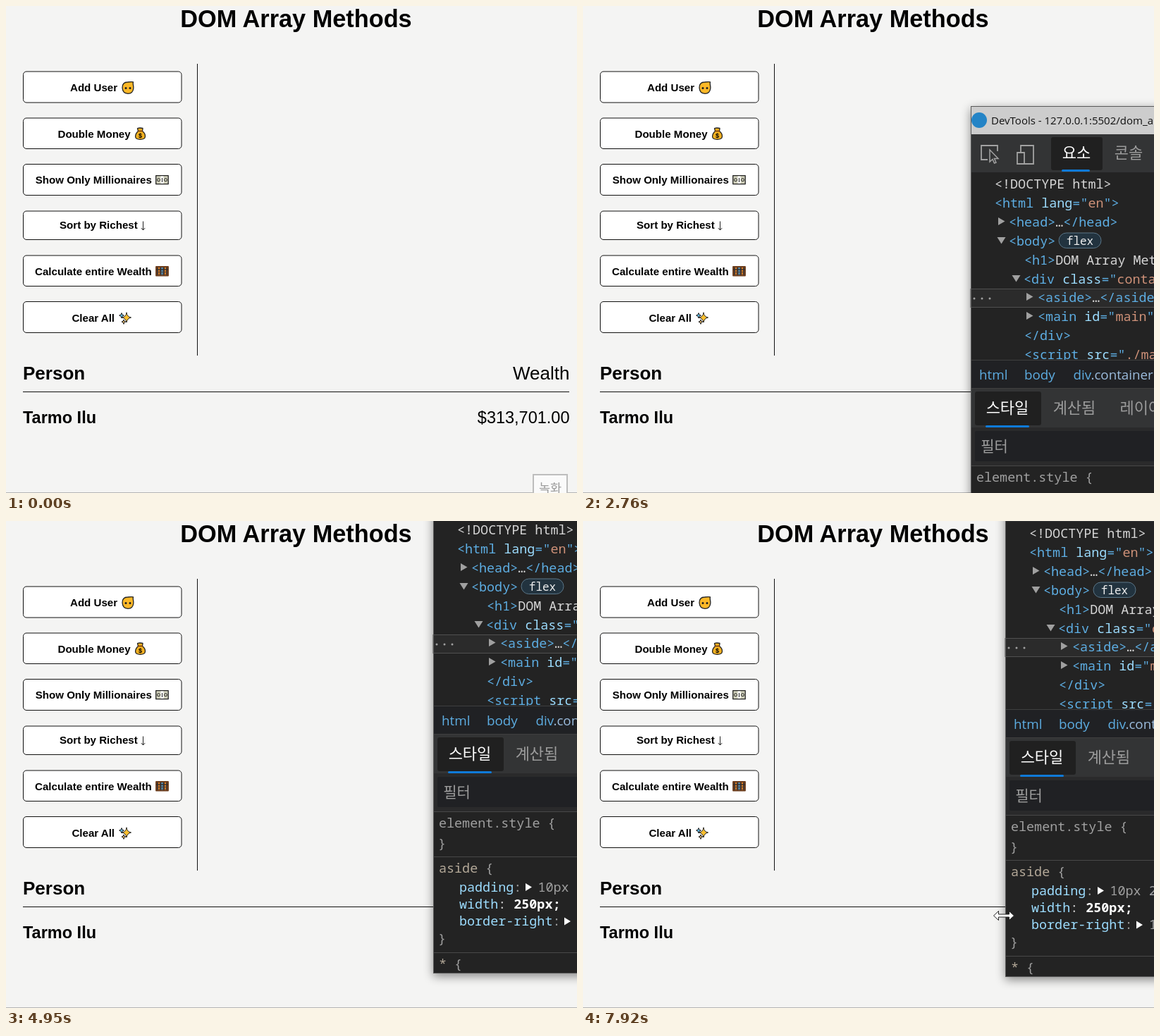
These frames come from a looping animation (810x691 px, 7.99 s). An HTML page:

```html
<!DOCTYPE html>
<html lang="en">
<head>
<meta charset="utf-8">
<title>DOM Array Methods</title>
<style>
html, body { margin: 0; width: 100%; height: 100%; overflow: hidden; background: #f4f4f3; }
svg { display: block; width: 810px; height: 691px; overflow: hidden; }
text { white-space: pre; }
.page { font-family: "Liberation Sans", Arial, sans-serif; fill: #000; }
.b { font-weight: bold; }
.btn rect { fill: #fff; stroke: #111; }
.btn text { font-size: 15.1px; font-weight: bold; }
.ui { font-family: "Open Sans", "Noto Sans", sans-serif; }
.ko { font: 22px "Noto Sans CJK KR", "Noto Sans CJK", sans-serif; text-anchor: middle; fill: #9c9c9c; }
.code { font: 500 18.4px "Noto Sans Mono", "DejaVu Sans Mono", monospace; fill: #d6d6d6; }
.tag { fill: #5dade2; }
.at { fill: #9cdcfe; }
.str { fill: #ce9178; }
.dim { fill: #a0a0a0; }
.sel { fill: #b3a898; }
.on { fill: #fff; }
.emo { stroke: #222; stroke-width: 1.3; stroke-linejoin: round; }
.cur { fill: #fff; stroke: #222; stroke-width: 1; stroke-linejoin: round; }
.shadow { filter: drop-shadow(0 4px 7px rgba(0, 0, 0, .45)); }
</style>
</head>
<body>
<svg viewBox="0 0 810 691">
  <g class="page">
    <rect width="810" height="691" fill="#f4f4f3"/>
    <text class="b" x="411.5" y="30" font-size="34.3" text-anchor="middle">DOM Array Methods</text>
    <g class="btn">
      <rect x="24.5" y="93" width="224.5" height="44" rx="4.5"/><text x="91" y="121">Add User</text>
      <rect x="24.5" y="159" width="224.5" height="43.5" rx="4.5"/><text x="73.5" y="187">Double Money</text>
      <rect x="24.5" y="224.5" width="224.5" height="44" rx="4.5"/><text x="41.7" y="252">Show Only Millionaires</text>
      <rect x="24.5" y="291" width="224.5" height="40.5" rx="4.5"/><text x="76" y="316">Sort by Richest</text>
      <rect x="24.5" y="354" width="224.5" height="43.5" rx="4.5"/><text x="41" y="381.5">Calculate entire Wealth</text>
      <rect x="24.5" y="419.5" width="224.5" height="44" rx="4.5"/><text x="93.4" y="448">Clear All</text>
    </g>
    <g class="emo">
      <g transform="translate(164 107)">
        <path d="M1 9Q1 1 8.5 1Q13 .5 16.5 .8Q15.8 3 16.6 6Q17 8 16.8 10Q16 17.3 9 17.3Q1.500 17 1 9Z" fill="#fcb827"/>
        <circle cx="6" cy="9.5" r=".9"/><circle cx="12" cy="9.5" r=".9"/>
      </g>
      <g transform="translate(182 172)">
        <path d="M5.5 5.5L4.5 1.5Q8 .5 12 1.5L11.5 5.5Q16 9 15.4 13.5Q15 17.3 8.5 17.3Q2 17.3 1.6 13.5Q1.5 9 5.5 5.5Z" fill="#f5b121"/>
        <path d="M5 5.5h7" stroke="#7b3d10" stroke-width="1.6"/>
        <text class="b" x="8.5" y="15" font-size="9" text-anchor="middle" stroke="none">$</text>
      </g>
      <g transform="translate(212 240)">
        <rect x=".7" y=".7" width="17.500" height="12" fill="#cfcfba"/>
        <rect x="7.500" y="1.500" width="4" height="10.500" fill="#fff" stroke="none"/>
        <g fill="none" stroke-width="1">
          <circle cx="4.500" cy="6.700" r="2"/><circle cx="14.500" cy="6.700" r="2"/>
          <path d="M9.500 4v6"/>
        </g>
      </g>
      <path d="M194.500 305.500v12.500M191.800 315l2.700 3 2.700-3" fill="none" stroke-width="1"/>
      <g transform="translate(212 369)">
        <rect x="1" y="1" width="17" height="12.500" fill="#4a3a32" stroke="#6b3c1c" stroke-width="1.800"/>
        <path d="M5 2v11M14 2v11" stroke="#e08020" stroke-width="2" stroke-dasharray="2.500 1"/>
        <path d="M9.500 2v11" stroke="#4f9fd0" stroke-width="2" stroke-dasharray="2.500 1"/>
        <path d="M1 5h17" stroke-width=".8"/>
      </g>
      <g transform="translate(160 434)" stroke-width="1">
        <path d="M11 .8Q11.500 7 17.500 8Q12 9 11 15Q10 9 4.500 8Q10.500 7 11 .8Z" fill="#fbbf2d"/>
        <path d="M4 1.500Q4.300 4.700 7.300 5Q4.500 5.500 4 9Q3.400 5.500 .6 5Q3.600 4.700 4 1.500Z" fill="#58b4e5"/>
        <path d="M7 11Q7.200 13.800 9.800 14Q7.400 14.500 7 17.400Q6.500 14.500 4 14Q6.700 13.800 7 11Z" fill="#d7a95a"/>
      </g>
    </g>
    <path d="M271.500 82V496M24 547.500H799" stroke="#111" fill="none"/>
    <path d="M0 690.500H810" stroke="#b4b4b4"/>
    <text class="b" x="24" y="530" font-size="26">Person</text>
    <text x="799.5" y="530" font-size="26" text-anchor="end">Wealth</text>
    <text class="b" x="24" y="591.5" font-size="23.5">Tarmo Ilu</text>
    <text x="799.5" y="591.5" font-size="23.5" text-anchor="end">$313,701.00</text>
  </g>

  <g id="tip">
    <rect x="748" y="665" width="48" height="40" fill="#fafafa" stroke="#bdbdbd" stroke-width="2"/>
    <text class="ko" x="772" y="690" style="font-size:17.5px">녹화</text>
  </g>

  <g id="frame">
    <rect class="shadow" width="1020" height="740" fill="#222"/>
    <g id="win">
      <rect width="1020" height="740" fill="#232323"/>
      <rect width="1020" height="40" fill="#cdcdcd"/>
      <circle cx="12" cy="20" r="11" fill="#2484c6"/>
      <text class="ui" x="29" y="25.5" font-size="15" fill="#111">DevTools - 127.0.0.1:5502/dom_array/index.html</text>

      <rect y="40" width="1020" height="54" fill="#333435"/>
      <rect x="114" y="44" width="73" height="47" rx="3" fill="#202020"/>
      <rect x="129" y="90" width="40" height="3" rx="1.5" fill="#0f7ad8"/>
      <g id="tabs">
        <g fill="none" stroke="#a2a2a2" stroke-width="1.8">
          <path d="M24 76H15V56H38V64"/>
          <path d="M27 62V79L31 75.5 33.5 81 36 80 33.5 74.5H39Z" stroke-width="1.5"/>
          <path d="M71 65V56H89V82H76M66 66h10v16h-10Z"/>
        </g>
        <g class="ko">
          <text class="on" x="150" y="74">요소</text><text x="224" y="74">콘솔</text>
          <text x="300" y="74">소스</text><text x="375" y="74">정보</text>
          <text x="505" y="74">응용 프로그램</text><text x="645" y="74">보안</text>
        </g>
      </g>

      <rect y="259.5" width="1020" height="26" fill="#2b2b2b" stroke="#505050"/>
      <g class="dim">
        <path d="M39 158v11l9.500-5.500ZM37.500 186h12l-6 9.500ZM58.500 240h12l-6 9.500ZM79 265v11l9.500-5.500ZM79 292v11l9.500-5.500Z"/>
        <circle cx="5" cy="273" r="1.5"/><circle cx="16" cy="273" r="1.5"/><circle cx="27" cy="273" r="1.5"/>
      </g>
      <g class="code" transform="translate(0 -.5)">
        <text x="34" y="117.5">&lt;!DOCTYPE html></text>
        <text x="34" y="144.5" class="tag">&lt;html <tspan class="at">lang</tspan>="<tspan class="str">en</tspan>"></text>
        <text x="54" y="171" class="tag">&lt;head><tspan fill="#d6d6d6">…</tspan>&lt;/head></text>
        <text x="54" y="198" class="tag">&lt;body></text>
        <rect x="125" y="180.5" width="60" height="21.5" rx="10.7" fill="#22333f" stroke="#5b7688"/>
        <text x="155" y="197.5" font-size="16" text-anchor="middle" fill="#eee">flex</text>
        <text x="76" y="225" class="tag">&lt;h1><tspan fill="#d6d6d6">DOM Array Methods</tspan>&lt;/h1></text>
        <text x="75" y="252" class="tag">&lt;div <tspan class="at">class</tspan>="<tspan class="str">container</tspan>"></text>
        <text x="95" y="278.5" class="tag">&lt;aside><tspan fill="#d6d6d6">…</tspan>&lt;/aside><tspan class="dim"> == $0</tspan></text>
        <text x="95" y="305.5" class="tag">&lt;main <tspan class="at">id</tspan>="<tspan class="str">main</tspan>"><tspan fill="#d6d6d6">…</tspan>&lt;/main></text>
        <text x="76" y="332.5" class="tag">&lt;/div></text>
        <text x="76" y="359" class="tag">&lt;script <tspan class="at">src</tspan>="<tspan class="str">./main.js</tspan>">&lt;/script></text>
      </g>

      <rect y="360" width="1020" height="41" fill="#202124"/>
      <path d="M0 360.5H1020M0 400.5H1020" stroke="#3f3f3f"/>
      <g class="ui tag" font-size="18.8">
        <text x="12" y="388">html</text><text x="76" y="388">body</text>
        <text x="145.5" y="388">div<tspan fill="#9bbbdc">.container</tspan></text>
        <text x="285" y="388">aside</text>
      </g>

      <rect y="401" width="1020" height="110" fill="#333435"/>
      <rect x="6" y="405" width="94" height="48" rx="3" fill="#202020"/>
      <rect id="tabHover" x="194" y="402" width="116" height="53" fill="#4b4b4b"/>
      <rect x="21" y="453" width="62" height="3" rx="1.5" fill="#0f7ad8"/>
      <g class="ko">
        <text class="on" x="52" y="436">스타일</text><text x="147" y="436">계산됨</text>
        <text x="252" y="436">레이아웃</text><text x="385" y="436">이벤트 수신기</text>
        <text x="530" y="436">DOM 중단점</text><text x="650" y="436">속성</text>
      </g>
      <rect y="456" width="1020" height="55" fill="#2a2a2b"/>
      <rect x="6" y="461" width="1004" height="43" rx="2" fill="#202124"/>
      <text class="ko" x="33.5" y="490" style="font-size:21px">필터</text>
      <path d="M0 510.5H1020M0 574.5H1020M0 710.5H1020" stroke="#484848"/>

      <g class="code">
        <text class="dim" x="8" y="533">element.style {</text>
        <text class="dim" x="7" y="562">}</text>
        <text x="8" y="596.5" class="sel">aside <tspan class="dim">{</tspan></text>
        <text x="37" y="623.5" class="at">padding<tspan class="dim">:</tspan></text>
        <text x="148.5" y="623.5" class="dim">10px 20px;</text>
        <text x="37" y="647.5" class="at">width<tspan fill="#d6d6d6">: </tspan><tspan class="on" font-weight="600">250px;</tspan></text>
        <text x="37" y="671.5" class="at">border-right<tspan class="dim">:</tspan></text>
        <text x="204" y="671.5" class="dim">1px solid #111;</text>
        <text class="dim" x="7" y="697">}</text>
        <text x="8" y="733" class="sel">* <tspan class="dim">{</tspan></text>
        <path class="on" d="M131 612v11l9-5.500ZM186 660.500v11l9-5.500Z"/>
      </g>
      <g id="checks">
        <g id="check">
          <rect x="8" y="607" width="22" height="22" rx="3" fill="#6a6a6a"/>
          <path d="M12.5 618.5l4.500 5 8.500-11" fill="none" stroke="#fff" stroke-width="2.8"/>
        </g>
        <use href="#check" y="24"/><use href="#check" y="48"/>
      </g>
      <rect x=".5" y=".5" width="1019" height="739" fill="none" stroke="#5a5a5a"/>
    </g>
  </g>

  <g id="preview" class="ui">
    <rect class="shadow" x="435" y="554.5" width="460" height="150" fill="#484848"/>
    <rect id="hover" y="554.5" width="226" height="140" fill="#5a5a5a"/>
    <circle cx="456" cy="576" r="11.5" fill="#2484c6"/>
    <circle cx="682" cy="576" r="11.5" fill="#2484c6"/>
    <text x="477" y="584" font-size="15.8" fill="#fff">DevTools - 127.0.0.1:...</text>
    <text x="703" y="584" font-size="15.8" fill="#fff">DevTools - 127.0.0.1:...</text>

    <rect x="446" y="598" width="203.5" height="100" fill="#232323"/>
    <rect x="446" y="606" width="203.5" height="21" fill="#333435"/>
    <use href="#tabs" transform="translate(446 598) scale(.2)"/>
    <rect x="488" y="615.5" width="8" height="1" fill="#0f7ad8"/>
    <path d="M446 616.5h203.5" stroke="#4a4a4a" stroke-width=".5"/>
    <rect x="494" y="618" width="41" height="8.5" fill="#202124"/>
    <g font-size="5" fill="#e4e4e4">
      <text x="469" y="624.5">top ▾</text><text x="496" y="624.5">필터</text><text x="539" y="624.5">기본 수준 ▾</text>
      <text x="595" y="613.5">»</text><text x="449" y="634" fill="#4a90d9">›</text>
    </g>
    <g fill="none" stroke="#ddd">
      <rect x="449.5" y="620" width="4" height="4"/><circle cx="462" cy="622" r="2"/><ellipse cx="487" cy="622" rx="2.5" ry="1.5"/>
      <circle cx="622" cy="611.5" r="1.7"/><circle cx="642.5" cy="622.5" r="1.7"/>
    </g>
    <rect x="605" y="609" width="8" height="5" rx="1" fill="#1d78c8"/><rect x="566" y="620" width="8" height="5" rx="1" fill="#1d78c8"/>

    <use href="#win" transform="translate(672 598) scale(.2)"/>
    <g id="strip">
      <rect x="446" y="598" width="203.5" height="8" fill="#fff"/>
      <circle cx="449" cy="602" r="2" fill="#2484c6"/>
      <text x="452.5" y="603.5" font-size="3.6" fill="#333">DevTools - 127.0.0.1:5502/dom_array/index.html</text>
    </g>
    <use href="#strip" x="226"/>
  </g>

  <g id="cursor" class="cur">
    <path id="arrow" d="M0 0V21L5 16.5 8.8 24.5 12 23 8.5 15H15Z"/>
    <path id="hand" d="M-2.5 1.5q2.200-3.500 4.500 0v8l7 1.500q4 1 3 5l-2 10h-11l-8-10q-1-4 3-2.500l3.500 3z"/>
    <path id="resize" d="M-14.5 0l7-6.500v4.500h15v-4.500l7 6.500-7 6.500v-4.500h-15v4.500z"/>
  </g>
</svg>
<script>
const LOOP = 7990;
const $ = id => document.getElementById(id);

// Each key is [time, x, y].
const winPath = [
  [2620, 410, 356], [2690, 482, 258], [2760, 550, 143], [2830, 577, 98], [3000, 597, 58], [3250, 603, 48],
  [4400, 603, 48], [4540, 604, -20], [4680, 606, -85], [4750, 606, -98],
  [4990, 606, -98], [5080, 599, -93]
];
const curPath = [
  [1040, 600, 700], [1200, 625, 650], [1470, 773, 623], [1810, 769, 631],
  [1900, 769, 631], [2500, 712, 378], [2620, 710, 376], [2690, 782, 278], [2760, 850, 163],
  [3440, 840, 470], [3590, 779, 511], [3720, 776, 560], [3920, 840, 600],
  [5260, 840, 100], [5480, 690, 300], [5700, 530, 500], [5860, 622, 550], [5930, 631, 554],
  [6160, 631, 554], [6400, 606, 574], [6890, 597, 560],
  [7020, 597, 560], [7120, 595, 562], [7230, 597, 560]
];

function along(keys, t) {
  const i = keys.findIndex(k => k[0] > t);
  if (i === 0) return keys[0].slice(1);
  if (i < 0) return keys[keys.length - 1].slice(1);
  const [t0, x0, y0] = keys[i - 1], [t1, x1, y1] = keys[i];
  const p = (t - t0) / (t1 - t0);
  return [x0 + (x1 - x0) * p, y0 + (y1 - y0) * p];
}

const ramp = (t, from, to) => Math.min(1, Math.max(0, (t - from) / (to - from)));
const show = (id, on) => { $(id).style.display = on ? "" : "none"; };
const within = (t, from, to) => t >= from && t < to;

function draw(t) {
  const [wx, wy] = along(winPath, t).map(Math.round);
  const [cx, cy] = along(curPath, t);

  show("tip", t < 70);

  show("preview", within(t, 720, 2090));
  $("preview").style.opacity = t < 790 ? .6 : 1 - ramp(t, 1950, 2090);
  $("hover").setAttribute("x", cx > 661 ? 661 : 435);
  show("hover", t >= 1050);

  const open = 1 - (1 - ramp(t, 1870, 2090)) ** 3;
  const scale = .9 + .1 * open;
  $("frame").style.opacity = open;
  $("frame").setAttribute("transform",
    `translate(${wx + 510 * (1 - scale)} ${wy + 370 * (1 - scale)}) scale(${scale})`);
  show("frame", open > 0);
  show("tabHover", within(t, 3450, 3680));
  show("checks", within(t, 5800, 6400));

  const hand = within(t, 3450, 3680), resize = t >= 6400;
  $("cursor").setAttribute("transform", `translate(${cx} ${cy})`);
  show("hand", hand);
  show("resize", resize);
  show("arrow", !hand && !resize);
}

function tick() {
  draw(performance.now() % LOOP);
  requestAnimationFrame(tick);
}
tick();
</script>
</body>
</html>
```
